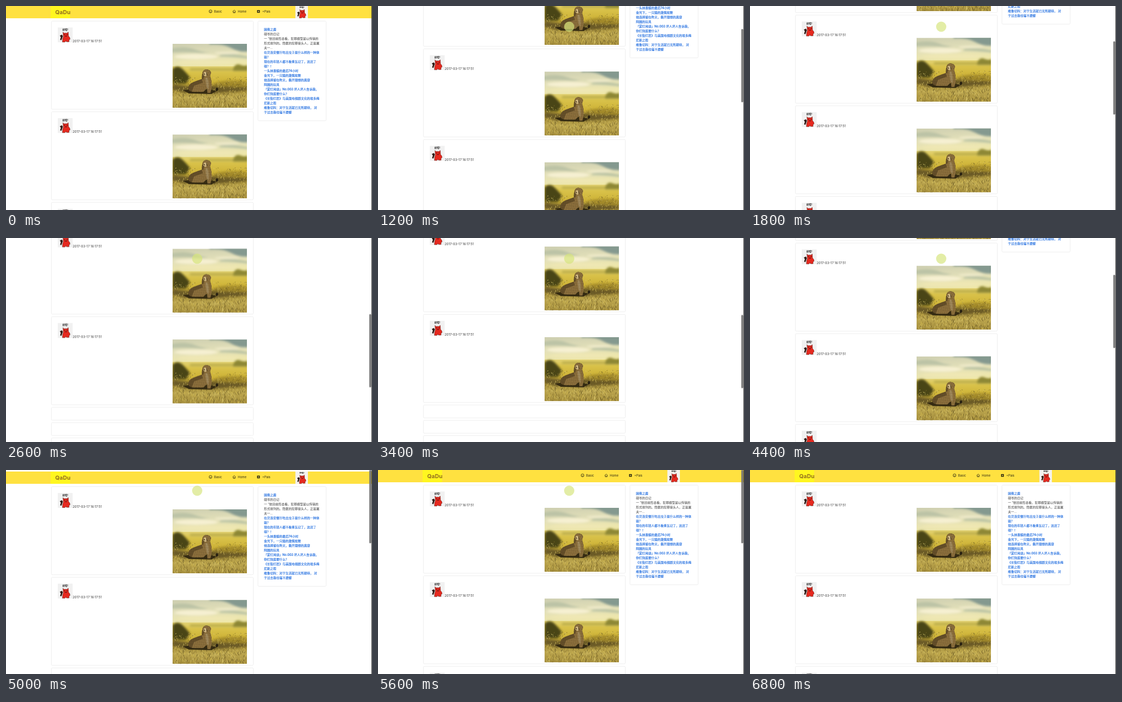
Recreate the animation shown at these times as an HTML page. Size 714 by 399 pixels, loop 7800 ms.

```html
<!DOCTYPE html>
<html lang="en">
<head>
<meta charset="utf-8">
<title>Feed scrolling</title>
<style>
  html, body { margin: 0; width: 100%; height: 100%; overflow: hidden; background: #fff; }
  svg { display: block; width: 714px; height: 399px; }
  text { font: 6px Inter, 'Noto Sans CJK SC', 'Noto Sans CJK', sans-serif; fill: #333; white-space: pre; }
  .link { fill: #1f6cdf; stroke: #1f6cdf; stroke-width: .15; font-weight: 500; }
  .date { font-size: 6.2px; }
  .card { fill: #fff; stroke: #e9e9e9; stroke-width: .8; }
  .icon { fill: none; stroke: #2b2812; stroke-width: .8; }
  .nav { fill: #2b2812; }
  .brand { font-size: 11px; font-weight: 700; fill: #94701f; }
  .shout { font-size: 4.6px; font-weight: 700; fill: #111; }
</style>
</head>
<body>
<svg viewBox="0 0 714 399">
  <defs>
    <linearGradient id="sky" x2=".2" y2="1">
      <stop offset="0" stop-color="#cdceb0"/>
      <stop offset=".5" stop-color="#e3e0b9"/>
      <stop offset="1" stop-color="#f0e8a8"/>
    </linearGradient>
    <linearGradient id="field" x2="0" y2="1">
      <stop offset="0" stop-color="#e2d274"/>
      <stop offset=".15" stop-color="#d9c24a"/>
      <stop offset=".38" stop-color="#cdb236"/>
      <stop offset=".55" stop-color="#a18a36"/>
      <stop offset=".75" stop-color="#bba54e"/>
      <stop offset="1" stop-color="#a58e3d"/>
    </linearGradient>
    <pattern id="spots" width="3" height="2.800" patternUnits="userSpaceOnUse" patternTransform="rotate(24)">
      <circle cx=".8" cy=".8" r=".7" fill="#33260f"/>
      <circle cx="2.300" cy="2.100" r=".65" fill="#33260f"/>
    </pattern>
    <filter id="soft" x="-30%" y="-30%" width="160%" height="160%"><feGaussianBlur stdDeviation="2"/></filter>
    <clipPath id="frame"><rect width="145" height="125"/></clipPath>

    <g id="photo" clip-path="url(#frame)">
      <rect width="145" height="50" fill="url(#sky)"/>
      <g filter="url(#soft)">
        <path d="M72-6H150V15Q130 17 114 8T72 1Z" fill="#84998f"/>
        <path d="M-4 9Q24 3 44 11T86 15L58 18Q30 15 -4 17Z" fill="#bcc3a6"/>
        <path d="M92 22Q114 17 148 25V29Q114 25 92 25Z" fill="#b9c2a3"/>
        <ellipse cx="46" cy="25" rx="42" ry="5" fill="#f6f0d2"/>
        <ellipse cx="106" cy="18" rx="24" ry="2.500" fill="#efeaca"/>
        <ellipse cx="70" cy="36" rx="60" ry="4" fill="#efe7b4"/>
      </g>
      <rect y="44" width="145" height="81" fill="url(#field)"/>
      <g filter="url(#soft)">
        <path d="M0 49Q10 40 20 50T34 66L26 78H0Z" fill="#4a4514"/>
        <path d="M118 49Q123 37 132 41T147 41V53H118Z" fill="#8d8735"/>
        <path d="M34 48H118V52H34Z" fill="#b8aa48"/>
        <path d="M78 78Q108 68 147 74V84H80Z" fill="#a38a2c"/>
        <path d="M0 79L30 83L82 82L145 85V91L78 97L20 95L0 89Z" fill="#6b5a28"/>
      </g>
      <g id="grass" fill="none"/>
      <path d="M20 91Q52 84 86 92L76 98L32 97Z" fill="#352b12"/>
      <path id="cat" d="M58 58Q59 51 65 50Q73 50 75 56L73 63Q77 73 76 86L74 96H68L67 87L60 94H42Q29 93 31 85Q34 76 46 73L57 69Z"/>
      <use href="#cat" fill="#ad8a4d"/>
      <path d="M31 85Q34 76 46 73L57 69L59 76L42 82L37 94Q29 93 31 85ZM58 58L62 62L60 69L57 69Z" fill="#45351a" opacity=".5"/>
      <path d="M68 66Q72 76 70 89L67 86Q64 75 64 66Z" fill="#dac28e" opacity=".65"/>
      <use href="#cat" fill="url(#spots)"/>
      <path d="M61 56Q63 54 67 56L66 63Q62 64 60 60Z" fill="#d2b983"/>
      <path d="M60 60L62 58L63 61M66 55.500L67 62" fill="none" stroke="#33240f"/>
      <ellipse cx="86.500" cy="89" rx="2.300" ry="3.200" fill="#261f11"/>
    </g>

    <g id="avatar">
      <text class="shout" x="14.700" y="5.500" text-anchor="middle">好哇!</text>
      <path d="M4 16L8 14L10 17L8.500 21L7 25L4.500 24L6 19Z" fill="#2e1a14"/>
      <path d="M10 9L12 11H18L20.500 9L21 17Q24 19 24 23L22 24V28H17L16 26L14 28.500H9L9.500 22L11 18Z" fill="#e6291f" stroke="#5a1712" stroke-width=".6"/>
      <path d="M12 13.500L14.500 14.500M19.500 13.500L17 14.500M14 17H18" fill="none" stroke="#2a0e0b" stroke-width=".9"/>
    </g>

    <g id="post">
      <rect class="card" x="88.500" y="0" width="394" height="172.300" rx="2"/>
      <rect x="101" y="12.500" width="29" height="29" fill="#f1f1f1"/>
      <use href="#avatar" x="101" y="12.500"/>
      <text class="date" x="130" y="41.700">2017-03-17 16:17:51</text>
      <use href="#photo" x="325" y="44.500"/>
    </g>
  </defs>

  <rect width="714" height="399" fill="#fff"/>
  <g id="page">
    <rect width="714" height="24" fill="#ffe140"/>
    <rect x="87" width="38" height="24" fill="#fff620"/>
    <text class="brand" x="96" y="16">QaDu</text>
    <g class="icon">
      <circle cx="399" cy="10.500" r="2.900"/>
      <path d="M397.500 11.300Q399 13 400.500 11.300M397.900 9.500V10M400.100 9.500V10"/>
      <path d="M442.300 10.600L445.200 7.900L448.100 10.600M443.200 10V13.200H447.200V10M445.200 11.300V13.200"/>
    </g>
    <rect x="489.800" y="7.900" width="5.400" height="5.400" rx=".6" fill="#2b2812"/>
    <path d="M492.500 9V12.200M490.900 10.600H494.100" stroke="#ffe140" stroke-width=".8"/>
    <text class="nav" x="406" y="12.700">Basic</text>
    <text class="nav" x="452.300" y="12.700">Home</text>
    <text class="nav" x="500" y="12.700">+Pais</text>
    <rect x="564.500" y="0" width="24.500" height="24" fill="#f4f2ee"/>
    <use href="#avatar" transform="translate(564.500 -1) scale(.86)"/>
    <g id="posts"></g>
    <rect class="card" x="491.500" y="29.500" width="133" height="195" rx="2"/>
    <g id="notes"></g>
  </g>
  <circle id="spot" cx="373" cy="40.500" r="10" fill="#d6e57c" fill-opacity=".68"/>
  <rect id="bar" x="708.800" y="0" width="3.600" height="143.500" rx="1.800" fill="#747474"/>
  <rect x="713" width="1" height="399" fill="#2b2b2b"/>
</svg>
<script>
const LOOP = 7800;
const $ = id => document.getElementById(id);

function add(parent, tag, attrs, text = '') {
  const el = document.createElementNS('http://www.w3.org/2000/svg', tag);
  for (const k in attrs) el.setAttribute(k, attrs[k]);
  el.textContent = text;
  parent.append(el);
  return el;
}

// Four full posts, then empty ones
for (let i = 0; i < 4; i++) add($('posts'), 'use', { href: '#post', y: 29.5 + i * 177.3 });
for (let i = 0; i < 12; i++)
  add($('posts'), 'rect', { class: 'card', x: 88.5, y: 738.7 + i * 29.9, width: 394, height: 25.2, rx: 2 });

// ASCII marks become full-width ones
const wide = s => s.replace(/[,?!:]/g, c => String.fromCharCode(c.charCodeAt(0) + 0xfee0));

// Lines starting with "-" are plain text, the rest are links
[
  '困倦之鹿', '-砚岑的日记', '-一 “依目前形态看,犯罪模型是以传销的',
  '-形式排列的。隐匿的犯罪接头人,正是屠', '-夫一...',
  '在贝洛安餐厅吃出虫子是什么样的一种体', '验?',
  '现在的年轻人都不看青瓦记了,这还了', '得?!',
  '一头抹香鲸的最后74小时', '金光下,一只猫的激情尬舞',
  '他选择留在昨天,撕开理想的真容', '阿圆的玩具',
  '「雾灯闲谈」No.003 坏人坏人告诉我,', '你们到底要什么?',
  '《长街灯匠》与美国电视剧文化的埃多梅', '尼斯之怨',
  '维鲁切科:对于生活就已无所期待, 对', '于过去我也毫不遗憾'
].forEach((line, i) => {
  const plain = line[0] === '-';
  add($('notes'), 'text', { x: 503.2, y: 48.2 + i * 9, class: plain ? '' : 'link' }, wide(plain ? line.slice(1) : line));
});

// Grass blades, longer towards the viewer
let seed = 7;
const rnd = () => (seed = (seed * 16807) % 2147483647) / 2147483647;
['#5f5020', '#dcc970', '#8a7630', '#d0b850'].forEach(stroke => {
  let d = '';
  for (let i = 0; i < 170; i++) {
    const depth = rnd(), y = 66 + depth * 62, h = 1.5 + depth * 3.5;
    d += `M${(rnd() * 145).toFixed(1)} ${y.toFixed(1)}l${(rnd() * 4 - 2).toFixed(1)} ${(-h).toFixed(1)}`;
  }
  add($('grass'), 'path', { d, stroke, opacity: .7 });
});

// time, scroll, pointer opacity, scrollbar opacity
const steps = [
  [0, 0, 0, 0], [400, 0, .5, 0], [600, 0, 1, 0],
  [1000, 52, 1, 1], [1200, 123, 1, 1], [1400, 162, 1, 1], [1600, 181, 1, 1], [1800, 189, 1, 1], [2000, 191, 1, 1],
  [2200, 238, 1, 1], [2400, 336, 1, 1], [2600, 407.5, 1, 1], [2800, 442, 1, 1], [3000, 457, 1, 1], [3200, 461, 1, 1],
  [3400, 412, 1, 1], [3600, 310, 1, 1], [3800, 243, 1, 1], [4000, 211.5, 1, 1], [4200, 200, 1, 1], [4400, 197, 1, 1],
  [4600, 142, 1, 1], [4800, 38, 1, 1], [5000, -3, 1, 1], [5200, -2, 1, 1], [5400, -1, 1, 1], [5600, 0, 1, 1],
  [6400, 0, .6, .6], [6600, 0, .25, .2], [6800, 0, 0, 0], [LOOP, 0, 0, 0]
];

function play(el, pose) {
  const frames = steps.map(s => ({ offset: s[0] / LOOP, easing: 'steps(1, end)', ...pose(s) }));
  el.animate(frames, { duration: LOOP, iterations: Infinity });
}
play($('page'), ([, y]) => ({ transform: `translateY(${-y}px)` }));
play($('spot'), ([, , opacity]) => ({ opacity }));
play($('bar'), ([, y, , opacity]) => ({ opacity, transform: `translateY(${Math.max(0, y * .365)}px)` }));
</script>
</body>
</html>
```
